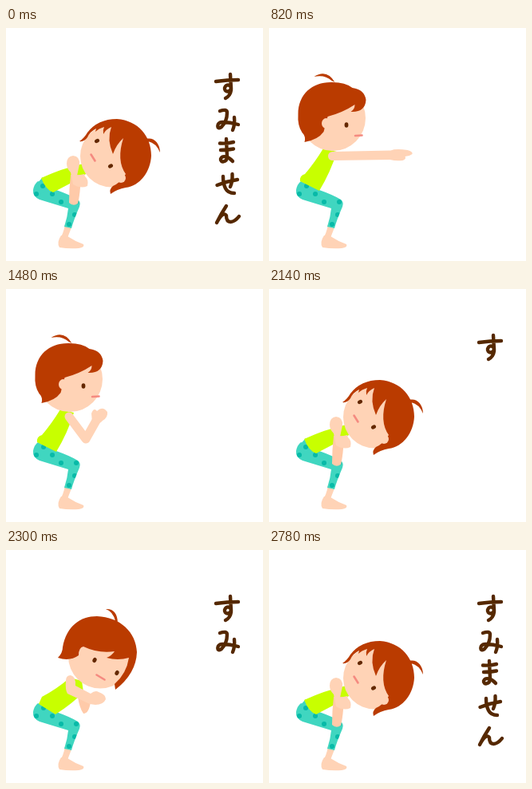
An HTML page that plays this animation: 322 px wide and 292 px high, repeating every 2.94 s.

```html
<!DOCTYPE html>
<html lang="ja">
<head>
<meta charset="utf-8">
<title>すみません</title>
<style>
  html, body { margin: 0; width: 100%; height: 100%; overflow: hidden; background: #fff; }
  svg { display: block; width: 322px; height: 292px; }
  .skin { fill: #ffd3b6; }
  .shade { fill: #ffcaa9; }
  .hair { fill: #ba3b00; }
  .shirt { fill: #c8ff00; }
  .pants { fill: #40d6c0; }
  .dots { fill: none; stroke: #08baa8; stroke-width: 6; stroke-linecap: round; }
  .eye { fill: #642800; }
  .mouth { fill: none; stroke: #f58a80; stroke-width: 2.6; stroke-linecap: round; }
  .limb { fill: none; stroke: #ffd3b6; stroke-width: 11; stroke-linecap: round; stroke-linejoin: round; }
  #words { fill: none; stroke: #552800; stroke-width: 4.4; stroke-linecap: round; stroke-linejoin: round; }
</style>
</head>
<body>
<svg viewBox="0 0 322 292">
  <defs>
    <clipPath id="bentClip"><path id="bentShape" d="M40 192L63 203Q80 209 90 215Q94 218 92 224Q85 240 82 251L73 249Q77 237 78 226Q55 219 42 215Q33 211 34 203Q35 196 40 192Z"/></clipPath>
    <clipPath id="straightClip"><path id="straightShape" d="M59 169H87Q87 179 83 187Q81 215 78 253H68Q65 225 65 187Q58 182 59 169Z"/></clipPath>
    <path id="foot" d="M69 260L77 261Q86 267 97 271Q99 275 91 276Q79 277 67 275Q63 269 69 260Z"/>

    <g id="bentLegs">
      <path class="skin" d="M74 246L82 250L77 263L67 265Q72 258 74 246Z"/>
      <use href="#foot" class="skin"/>
      <use href="#bentShape" class="pants"/>
      <path class="dots" clip-path="url(#bentClip)" d="M38 208h.1M47 198h.1M58 208h.1M69 218h.1M88 218h.1M86 234h.1M79 246h.1"/>
    </g>

    <g id="sideHead">
      <circle class="skin" cx="70.5" cy="71" r="41"/>
      <path class="hair" d="M35 101Q37 94 32 89Q26 80 27 66C27 40 46 25 70 26Q86 26 95 33Q110 35 112 48Q111 64 93 63Q98 60 98 54Q83 64 64 69L59 88Q52 98 35 101ZM47 19Q63 9 73 26L69 24Q60 16 47 19Z"/>
      <ellipse class="skin" cx="62" cy="77.500" rx="5.500" ry="6.500"/>
      <ellipse class="eye" cx="87.500" cy="79.500" rx="2.400" ry="3.200"/>
      <path class="mouth" d="M98.500 93L107 92.500"/>
    </g>
    <path id="reach" class="skin" d="M73 115L146 113.500Q152 111 167 113Q174 115 173 118Q169 121 164 121Q166 124 161 126Q153 127 145 125L73 126A5.500 5.500 0 0 1 73 115Z"/>
    <path id="leanShirt" class="shirt" d="M68 151L85 155Q77 181 63 204L39 192Q38 185 45 183Q57 169 68 151Z"/>
  </defs>

  <g id="stand">
    <path class="skin" d="M68 250H77V263H67Z"/>
    <use href="#foot" class="skin"/>
    <use href="#straightShape" class="pants"/>
    <path class="dots" clip-path="url(#straightClip)" d="M68 178h.1M79 172h.1M80 186h.1M69 197h.1M79 209h.1M69 218h.1M79 227h.1M69 238h.1M77 248h.1"/>
    <path class="shirt" d="M67 112C59 122 59 137 59 170H87C88 140 86 121 79 111Z"/>
    <use href="#sideHead"/>
    <use href="#reach"/>
  </g>

  <g id="squat">
    <use href="#bentLegs"/>
    <use href="#leanShirt"/>
    <use href="#sideHead" x="9.500" y="42"/>
    <use href="#reach" x="6.500" y="40"/>
  </g>

  <g id="fold">
    <use href="#bentLegs"/>
    <use href="#leanShirt"/>
    <use href="#sideHead" x="9.500" y="42"/>
    <path class="limb" d="M79 160L100 188L113 165"/>
    <path class="skin" d="M107 156Q110 148 114 153Q121 146 127 154Q128 161 121 165Q115 172 108 167Z"/>
  </g>

  <g id="twistRight">
    <use href="#bentLegs"/>
    <path class="shirt" d="M80 160L95 164L97 178Q84 192 62 206L41 193L45 184Q64 174 80 160Z"/>
    <circle class="skin" cx="118" cy="133.500" r="40"/>
    <path class="hair" d="M65 135Q71 129 71 122C76 95 93 83 114 83C143 84 163 103 164 128Q163 155 137 175L136 168Q151 155 154 135Q140 139 126 135Q133 132 136 127Q116 130 97 121Q91 122 91 132Q80 140 65 135ZM125 74Q139 73 140 91L137 89Q134 77 125 74Z"/>
    <ellipse class="eye" cx="111" cy="138" rx="2.400" ry="3.200" transform="rotate(28 111 138)"/>
    <ellipse class="eye" cx="139" cy="154" rx="2.400" ry="3.200" transform="rotate(28 139 154)"/>
    <path class="mouth" d="M113.500 156.500L123.500 162.500"/>
    <path class="shade" d="M90 184L106 190Q104 205 97 205Q92 198 90 184Z"/>
    <path class="skin" d="M75 164Q75 157 81 157Q88 159 87 170L106 180Q112 175 116 178Q125 181 125 187Q122 194 112 194L105 193L90 186L77 180Q74 175 75 164Z"/>
  </g>

  <g id="twistLeft">
    <use href="#bentLegs"/>
    <path class="pants" d="M36 198L46 187L52 204L42 208Z"/>
    <path class="dots" d="M46 198h.1"/>
    <path class="shirt" d="M44 188Q70 176 97 170L100 172V183L80 195L59 206Q50 203 44 188Z"/>
    <circle class="skin" cx="132" cy="160.500" r="39"/>
    <path class="hair" d="M92 142Q98 138 102 131Q115 114 139 114C166 116 182 136 182 160C181 180 168 198 150 200Q139 202 131 208Q129 202 134 198Q142 195 150 183Q138 166 147 138Q138 146 134 158Q126 140 132 124Q125 127 122 133Q121 128 123 124Q116 126 112 130L113 126Q105 130 102 137Q98 143 92 142ZM173 140C184 135 193 144 193 156Q188 144 178 142Z"/>
    <circle class="skin" cx="144" cy="188" r="6"/>
    <ellipse class="eye" cx="114" cy="141.500" rx="2.400" ry="3.200" transform="rotate(60 114 141.500)"/>
    <ellipse class="eye" cx="131" cy="173" rx="2.400" ry="3.200" transform="rotate(60 131 173)"/>
    <path class="mouth" d="M106.500 158.500L111.500 166.500"/>
    <path class="shade" d="M81 184H93V200Q92 212 90 220Q84 224 79 219Q79 202 81 184Z"/>
    <path class="skin" d="M76 170Q76 161 84 160Q93 161 92 171L89 185L98 183L99 186Q104 190 102 198Q94 202 84 196L81 181Q76 176 76 170Z"/>
  </g>

  <g id="words" role="img" aria-label="すみません">
    <path d="M263 67Q277 65 291 65M281 58L282 75C281 82 273 80 274 75C276 69 283 71 282 78Q281 85 275 88"/>
    <path d="M268 104Q277 101 277 106Q277 117 270 124C264 129 263 118 271 118Q281 118 291 121M286 112Q287 121 284 128"/>
    <path d="M268 144.500Q277 145 285 143M269 153Q277 153 285 151.500M276 139L277 161C277 169 268 169 269 164C271 159 279 161 284 167"/>
    <path d="M264.500 197Q277 192 290 190M283.500 183Q284 192 281 199M272 186Q272 195 275 201Q278 207 286 207"/>
    <path d="M276 223Q270 232 264 244Q272 229 276 235C276 246 285 245 292 236"/>
  </g>
</svg>
<script>
  const LOOP = 2940;
  // start time, pose, letters shown
  const steps = [
    [0, 'twistLeft', 5],
    [160, 'stand', 0],
    [820, 'squat', 0],
    [1480, 'fold', 0],
    [1980, 'twistRight', 0],
    [2140, 'twistLeft', 1],
    [2300, 'twistRight', 2],
    [2460, 'twistLeft', 3],
    [2620, 'twistRight', 4],
    [2780, 'twistLeft', 5],
  ];
  const poses = document.querySelectorAll('svg > g:not(#words)');
  const letters = document.querySelectorAll('#words path');
  const show = (el, on) => { el.style.display = on ? '' : 'none'; };

  function draw() {
    const t = performance.now() % LOOP;
    const [, pose, count] = steps.findLast(([start]) => start <= t);
    poses.forEach(el => show(el, el.id === pose));
    letters.forEach((el, i) => show(el, i < count));
    requestAnimationFrame(draw);
  }
  draw();
</script>
</body>
</html>
```
